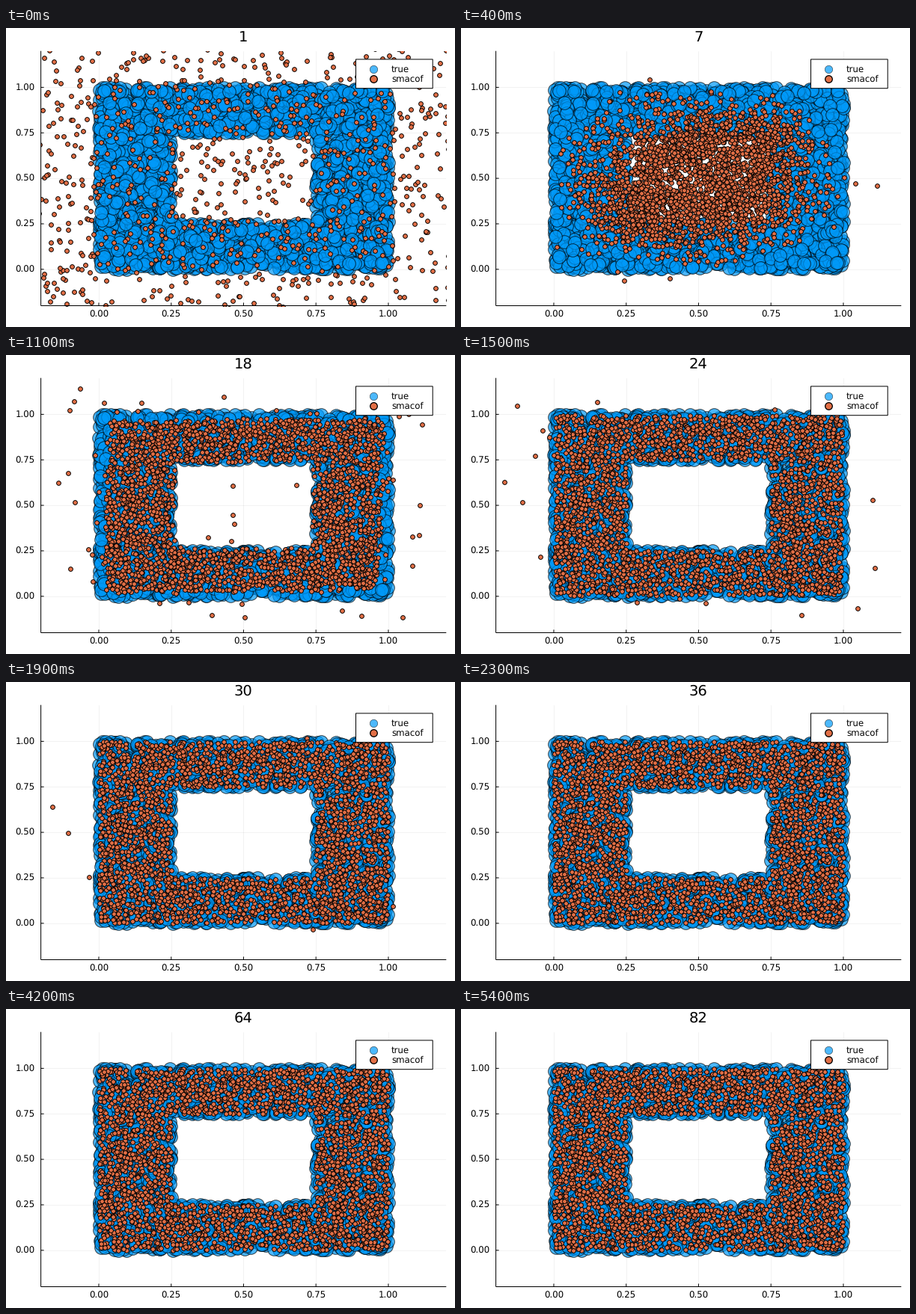
Write a matplotlib script that moves like this. It is 600 px wide and 400 px high and loops after 5.5 s.

```python
import numpy as np
import matplotlib.pyplot as plt
from matplotlib.animation import FuncAnimation
from matplotlib.patches import Rectangle

plt.rcParams["font.family"] = "DejaVu Sans"
plt.rcParams["text.hinting"] = "none"

W, H, DPI = 600, 400, 100
FRAMES, INTERVAL = 55, 100
PX = 72 / DPI  # one pixel in points
LEFT, RIGHT, TOP, BOTTOM = 46.6, 588.3, 30.7, 371.5
LO, HI = -0.2, 1.2
BLUE, ORANGE = "#009afa", "#e26f46"
TICKS = (0, 0.25, 0.5, 0.75, 1)

rng = np.random.default_rng(7)
N, STRAGGLERS, LATE = 3000, 60, 330


def square_frame(n):
    """Uniform points in the unit square around an empty middle."""
    p = rng.random((3 * n, 2))
    return p[np.abs(p - 0.5).max(axis=1) > 0.25][:n]


def unit(angle):
    return np.column_stack((np.cos(angle), np.sin(angle)))


true = square_frame(N)
goal = true - 0.5
radius = np.linalg.norm(goal, axis=1, keepdims=True)
start = rng.normal(size=(N, 2))
blob = unit(rng.uniform(0, 2 * np.pi, N)) * (0.5 * np.sqrt(rng.random(N)))[:, None]
spread = goal / radius * rng.exponential(0.045, N)[:, None]

# iteration at which each point finds its place
settle = rng.normal(6.5, 1.4, N)
settle[-LATE:] = 9.5 + rng.exponential(2.6, LATE)

# a few points go round the outside of the square before they join
far_goal = goal[:STRAGGLERS]
goal_angle = np.arctan2(far_goal[:, 1], far_goal[:, 0])
goal_reach = np.abs(far_goal).max(axis=1)
detour = rng.uniform(-1, 1, STRAGGLERS)
far_reach = 0.5 + rng.uniform(0.02, 0.18, STRAGGLERS)
arrive = 17 + 20 * rng.random(STRAGGLERS) ** 1.5


def smacof(k):
    """Configuration after iteration k."""
    if k == 1:
        return 0.5 + start
    shrink = 0.6 / (1 + np.exp((k - 10.8) / 3))
    skew = np.array([[1 - shrink, shrink / 3], [shrink / 3, 1 - shrink]])
    core = goal * (1 - 0.8 * shrink * radius) @ skew + 4 * shrink * spread
    w = 1 / (1 + np.exp(np.clip((settle - k) / 0.8, -40, 40)))[:, None]
    pos = (1 - w) * blob + w * core

    u = np.clip((k - arrive + 8) / 8, 0, 1)
    u = u * u * (3 - 2 * u)
    ray = unit(goal_angle + (1 - u) * detour)
    ray /= np.abs(ray).max(axis=1, keepdims=True)
    reach = (1 - u) * far_reach * (1 - shrink) + u * goal_reach
    pos[:STRAGGLERS] = ray * reach[:, None]
    return 0.5 + pos


def x_px(v):
    return LEFT + (v - LO) / (HI - LO) * (RIGHT - LEFT)


def y_px(v):
    return BOTTOM - (v - LO) / (HI - LO) * (BOTTOM - TOP)


fig = plt.figure(figsize=(W / DPI, H / DPI), dpi=DPI, facecolor="white")
ax = fig.add_axes([LEFT / W, 1 - BOTTOM / H, (RIGHT - LEFT) / W, (BOTTOM - TOP) / H])
ax.set(xlim=(LO, HI), ylim=(LO, HI))
ax.axis("off")

# overlay in pixel coordinates
top = fig.add_axes([0, 0, 1, 1], zorder=2)
top.set(xlim=(0, W), ylim=(H, 0))
top.axis("off")


def line(xs, ys):
    top.plot(xs, ys, color="black", lw=PX, solid_capstyle="butt", snap=False)


def label(x, y, text, ha="left", size=8.5):
    return top.text(x, y, text, ha=ha, va="baseline", fontsize=size)


line((LEFT, LEFT), (TOP, BOTTOM))
line((LEFT, RIGHT), (BOTTOM, BOTTOM))
for t in TICKS:
    x, y = x_px(t), y_px(t)
    ax.axvline(t, color="black", alpha=0.1, lw=0.5 * PX, zorder=0)
    ax.axhline(t, color="black", alpha=0.1, lw=0.5 * PX, zorder=0)
    line((x, x), (BOTTOM, BOTTOM - 4))
    line((LEFT, LEFT + 4), (y, y))
    label(x, 387.2, f"{t:.2f}", "center")
    label(38.6, y + 4.2, f"{t:.2f}", "right")

ax.plot(*true.T, "o", ms=17.6 * PX, mfc=BLUE, mec="black", mew=PX,
        alpha=0.7, zorder=1)
dots, = ax.plot([], [], "o", ms=5.8 * PX, mfc=ORANGE, mec="black",
                mew=0.95 * PX, zorder=2)

top.add_patch(Rectangle((467.5, 41.9), 102.7, 38.8, fc="white", ec="black",
                        lw=PX, snap=False, zorder=3))
top.plot(491, 55.1, "o", ms=10.4 * PX, mfc=BLUE, mec="black", mew=0.6 * PX,
         alpha=0.7, zorder=4)
top.plot(491, 68.1, "o", ms=9.6 * PX, mfc=ORANGE, mec="black", mew=1.3 * PX, zorder=4)
label(515, 59.3, "true").set_zorder(4)
label(515, 72.3, "smacof").set_zorder(4)
title = label(317.4, 18, "1", "center", 14)


def draw(i):
    k = 1 + (3 * i + 1) // 2
    dots.set_data(*smacof(k).T)
    title.set_text(str(k))
    return dots, title


anim = FuncAnimation(fig, draw, frames=FRAMES, interval=INTERVAL, repeat=True)
plt.show()
```
